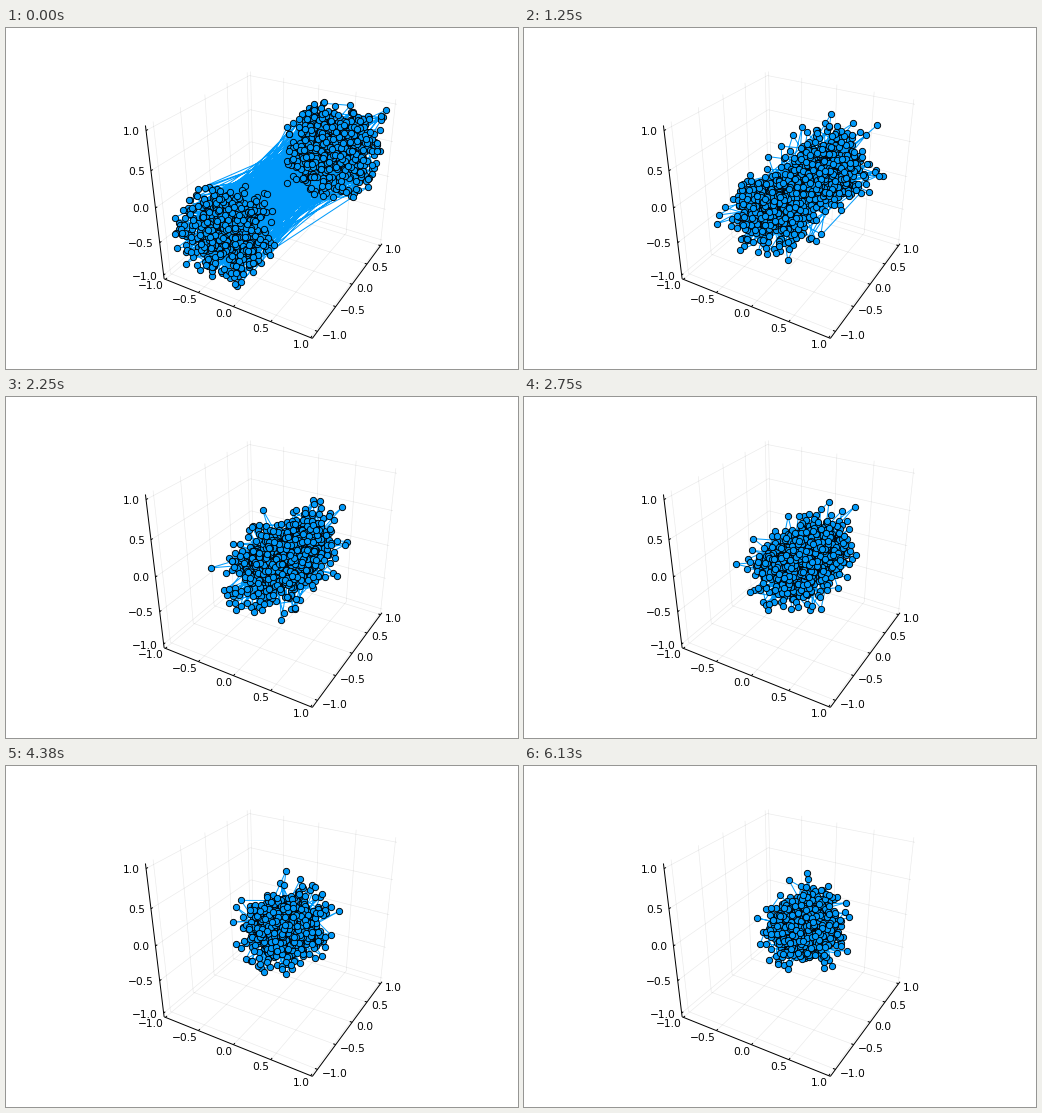
Recreate the animation shown at these times as a matplotlib script. Size 512 by 341 pixels, loop 6.26 s.

```python
import numpy as np
import matplotlib.pyplot as plt
from matplotlib.animation import FuncAnimation
from matplotlib.collections import LineCollection

WIDTH, HEIGHT, DPI = 512, 341, 100
PX = 72 / DPI                      # one pixel in points
FRAMES, LOOP_MS = 50, 6260
BLUE = "#009AFA"
TICKS = np.array([-1, -0.5, 0, 0.5, 1])
COUNT = 1000

# Data to box coordinates, one scale and shift per axis
SCALE = np.array([0.98, 0.915, 0.943])
SHIFT = np.array([0, 0.035, 0])

# Perspective camera, 30 degrees of azimuth and elevation
S, C = 0.5, np.sqrt(3) / 2
RIGHT = np.array([C, S, 0])
UP = np.array([-S * S, S * C, C])
TOWARD = np.array([C * S, -C * C, S])
DISTANCE, FOCAL = 6.9, 589
CENTER = np.array([271.7, 163.6])


def project(box):
    """Map box coordinates in [-1, 1] to stage pixels."""
    box = np.asarray(box, float)
    scale = FOCAL / (DISTANCE - box @ TOWARD)
    return np.stack([CENTER[0] + box @ RIGHT * scale,
                     CENTER[1] - box @ UP * scale], axis=-1)


def simulate():
    """Two cubes of points merge into one cloud, each point at its own rate."""
    rng = np.random.default_rng(12)
    side = rng.choice([-1, 1], (COUNT, 1))
    points = 0.49 * side + rng.uniform(-0.46, 0.46, (COUNT, 3))
    rest = np.array([0.08, 0.04, 0.03])
    keep = np.exp(-rng.uniform(0.03, 0.15, (COUNT, 1)))
    noise = 0.18 * np.sqrt(1 - keep ** 2)
    history = [points]
    for _ in range(FRAMES - 1):
        points = rest + keep * (points - rest) + noise * rng.normal(size=points.shape)
        history.append(points)
    return history


def add_lines(ax, segments, **style):
    ax.add_collection(LineCollection([project(s) for s in segments], **style))


def draw_grid(ax):
    segments = []
    for x, y, z in TICKS[:, None] * SCALE + SHIFT:
        segments += [
            [(x, -1, -1), (x, 1, -1)], [(x, 1, -1), (x, 1, 1)],
            [(-1, y, -1), (1, y, -1)], [(-1, y, -1), (-1, y, 1)],
            [(-1, -1, z), (-1, 1, z)], [(-1, 1, z), (1, 1, z)],
        ]
    add_lines(ax, segments, colors="black", alpha=0.08, linewidths=0.7 * PX, zorder=1)


def draw_axes(ax):
    add_lines(ax, [[(-1, -1, -1), (1, -1, -1)],
                   [(1, -1, -1), (1, 1, -1)],
                   [(-1, -1, -1), (-1, -1, 1)]],
              colors="black", linewidths=PX, zorder=2)
    size = 0.03
    marks = []
    for value in TICKS:
        x, y, z = value * SCALE + SHIFT
        label = f"{value:.1f}".replace("-", "\u2212")
        # tick point, tick direction, label offset, alignment
        rows = [
            ((x, -1, -1), (0, size, 0), (-1.2, 6), "right"),
            ((1, y, -1), (-size, 0, 0), (4.4, 3.2), "left"),
            ((-1, -1, z), (0, size, 0), (-5.8, 0.5), "right"),
        ]
        for point, step, offset, align in rows:
            marks.append([point, np.add(point, step)])
            left, top = project(point) + offset
            ax.text(left, top, label, ha=align, va="center_baseline",
                    fontsize=10.67 * PX, family="DejaVu Sans", color="black")
    add_lines(ax, marks, colors="black", linewidths=PX, zorder=2)


fig = plt.figure(figsize=(WIDTH / DPI, HEIGHT / DPI), dpi=DPI, facecolor="white")
ax = fig.add_axes([0, 0, 1, 1])
ax.set(xlim=(0, WIDTH), ylim=(HEIGHT, 0))
ax.axis("off")
draw_grid(ax)
draw_axes(ax)

paths = [project(points * SCALE + SHIFT) for points in simulate()]
chain, = ax.plot([], [], "-o", color=BLUE, linewidth=PX, markersize=6.3 * PX,
                 markeredgecolor="black", markeredgewidth=0.9 * PX,
                 snap=False, zorder=3)


def update(frame):
    chain.set_data(*paths[frame].T)
    return chain,


animation = FuncAnimation(fig, update, frames=FRAMES, interval=LOOP_MS / FRAMES,
                          repeat=True, repeat_delay=0)
plt.show()
```
